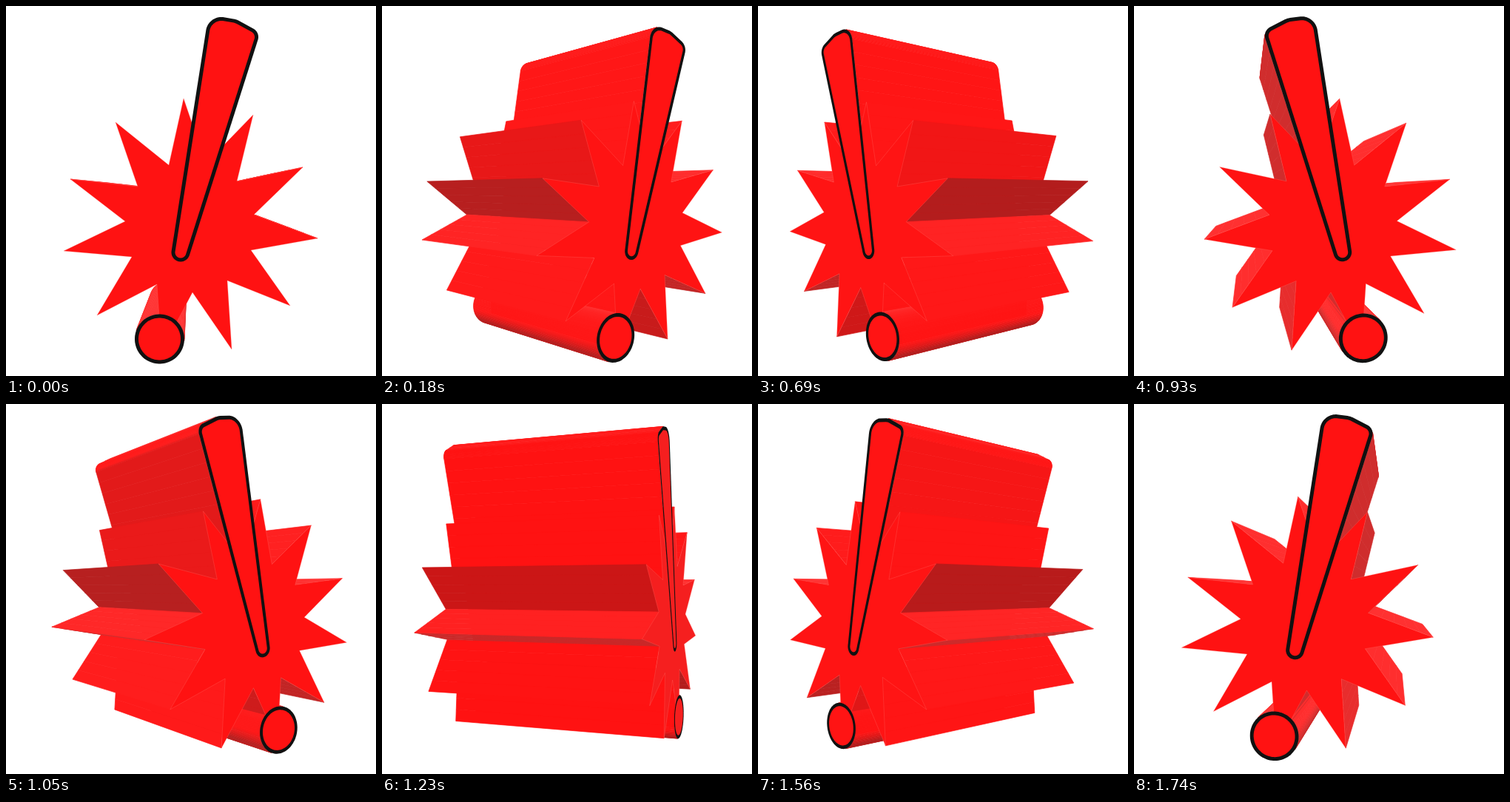
An HTML page with a canvas for the animation above (1770 ms loop, 500x500 px).

```html
<!DOCTYPE html>
<html lang="en">
<head>
<meta charset="utf-8">
<title>Spinning exclamation mark</title>
<style>
  html, body { margin: 0; width: 100%; height: 100%; overflow: hidden; background: #fff; }
  canvas { display: block; width: 500px; height: 500px; }
</style>
</head>
<body>
<canvas id="stage" width="500" height="500"></canvas>
<script>
const ctx = document.getElementById('stage').getContext('2d');
const CENTER = 250, DEPTH = 172, CAMERA = 1102, FOCAL = CAMERA - DEPTH;
const STEP = 30, STEPS = 59, HALF = 31;
const RIM = 5;

const centered = ([x, y]) => [x - CENTER, y - CENTER];

const star = [
  [240, 125], [270, 213], [334, 147], [312, 237], [401, 218], [335, 282],
  [421, 314], [331, 330], [384, 405], [299, 371], [305, 464], [252, 387],
  [210, 466], [204, 376], [123, 418], [170, 339], [78, 331], [161, 291],
  [87, 234], [178, 244], [148, 157], [220, 215]
].map(centered);

// Convex hull of circles [x, y, r], sampled by direction; inset shrinks it evenly.
function hull(circles, inset = 0, samples = 90) {
  return Array.from({ length: samples }, (_, i) => {
    const a = i / samples * 2 * Math.PI, c = Math.cos(a), s = Math.sin(a);
    const reach = ([x, y, r]) => x * c + y * s + r;
    const [x, y, r] = circles.reduce((p, q) => reach(q) > reach(p) ? q : p);
    return centered([x + (r - inset) * c, y + (r - inset) * s]);
  });
}

const barCircles = [[291, 36, 21], [303, 42, 25], [328, 42, 13], [236, 333, 12.5]];
const dotCircles = [[207.5, 450, 33.5]];
const bar = hull(barCircles), barInner = hull(barCircles, RIM);
const dot = hull(dotCircles), dotInner = hull(dotCircles, RIM);

// Cut each outline edge into short walls so that depth sorting is reliable.
function wallsOf(outline) {
  const walls = [];
  outline.forEach(([x0, y0], i) => {
    const [x1, y1] = outline[(i + 1) % outline.length];
    const dx = x1 - x0, dy = y1 - y0, length = Math.hypot(dx, dy);
    if (length < 0.01) return;
    const parts = Math.ceil(length / 20);
    const at = k => [x0 + dx * k / parts, y0 + dy * k / parts];
    for (let k = 0; k < parts; k++) {
      walls.push({ a: at(k), b: at(k + 1), mid: at(k + 0.5), nx: dy / length, ny: -dx / length });
    }
  });
  return walls;
}
const walls = [star, bar, dot].flatMap(wallsOf);

function shade(facing, ny) {
  const glance = (1 - Math.min(1, Math.max(0, facing))) ** 2;
  const light = Math.max(0, 0.85 * facing - 0.5 * ny);
  const red = Math.min(255, 158 + 200 * light + 62 * glance);
  const rest = 18 + 34 * glance;
  return `rgb(${red | 0},${rest | 0},${rest | 0})`;
}

function angleAt(step) {
  const degrees = step < HALF ? step * 6 : 186 + (step - HALF) * 174 / (STEPS - HALF);
  return degrees * Math.PI / 180;
}

function draw(step) {
  const angle = angleAt(step), sin = Math.sin(angle), cos = Math.cos(angle);

  const project = ([x, y], z) => {
    const scale = FOCAL / (CAMERA + x * sin - z * cos);
    return [CENTER + (x * cos + z * sin) * scale, CENTER + y * scale];
  };
  const polygon = (points, fill, line, width) => {
    ctx.beginPath();
    points.forEach(p => ctx.lineTo(...p));
    ctx.closePath();
    ctx.fillStyle = fill;
    ctx.fill();
    if (!line) return;
    ctx.strokeStyle = line;
    ctx.lineWidth = width;
    ctx.stroke();
  };

  ctx.fillStyle = '#fff';
  ctx.fillRect(0, 0, 500, 500);
  ctx.lineJoin = 'round';

  const eye = -CAMERA * sin;
  const distance = w => Math.hypot(w.mid[0] - eye, w.mid[1]);
  walls
    .filter(w => w.nx * (eye - w.mid[0]) - w.ny * w.mid[1] > 0)
    .sort((p, q) => distance(q) - distance(p))
    .forEach(w => {
      const color = shade(-w.nx * sin, w.ny);
      polygon([project(w.a, DEPTH), project(w.b, DEPTH),
               project(w.b, -DEPTH), project(w.a, -DEPTH)], color, color, 0.7);
    });

  // At most one cap faces the camera; nothing can cover it.
  if (Math.abs(cos) * CAMERA <= DEPTH) return;
  const z = cos > 0 ? DEPTH : -DEPTH;
  const red = shade(Math.abs(cos), 0);
  const cap = (outline, fill, line) => polygon(outline.map(p => project(p, z)), fill, line, 0.6);
  cap(star, red, 'rgba(255,110,105,0.5)');
  cap(bar, '#111');
  cap(barInner, red);
  cap(dot, '#111');
  cap(dotInner, red);
}

const start = performance.now();
let shown = -1;
function tick() {
  const step = Math.floor((performance.now() - start) / STEP) % STEPS;
  if (step !== shown) draw(shown = step);
  requestAnimationFrame(tick);
}
tick();
</script>
</body>
</html>
```
